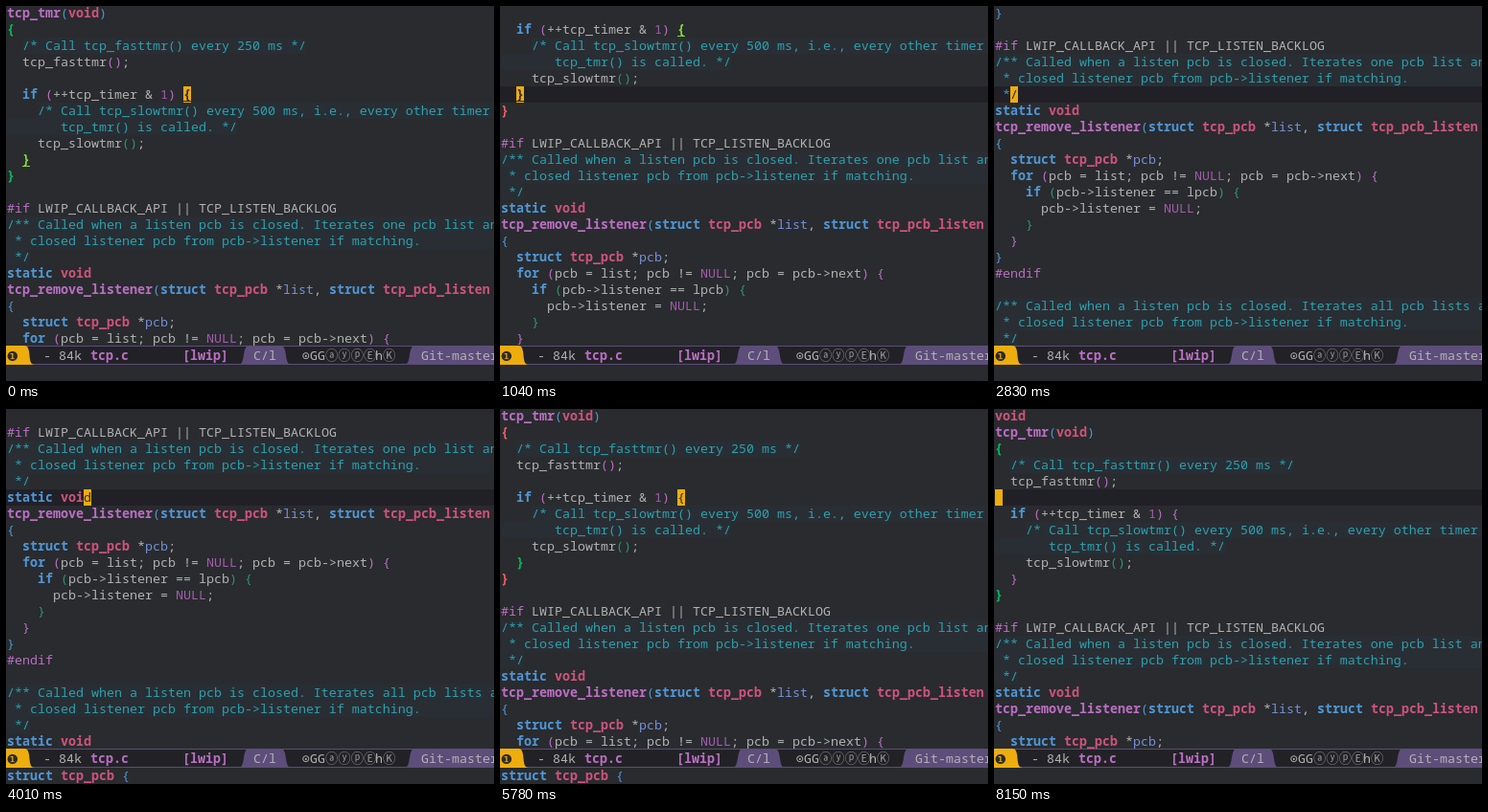
These frames come from a looping animation (509 by 392 pixels, 8.6 s). An HTML page:

```html
<!DOCTYPE html>
<html lang="en">
<head>
<meta charset="utf-8">
<title>Editor with a centred cursor</title>
<style>
html, body { margin: 0; width: 100%; height: 100%; overflow: hidden; background: #292b2e; }
#stage {
  position: relative; width: 509px; height: 392px; overflow: hidden;
  background: #292b2e; color: #b2b2b2; white-space: pre;
  font: 13.333px/17px "Noto Sans Mono", "DejaVu Sans Mono", monospace;
  font-variant-ligatures: none;
}
#view { position: absolute; inset: 0 0 37px; overflow: hidden; }
#code { position: absolute; left: 0; top: 0; width: 100%; }
.line { height: 17px; padding-left: 1px; overflow: hidden; }
.current { background: #212026; }
#cursor {
  position: absolute; top: 84px; width: 8px; height: 17px;
  background: #eead0e; color: #292b2e;
}
#cursor.matched { font-weight: bold; text-decoration: underline; text-underline-offset: 2px; }
#echo { position: absolute; left: 1px; top: 375px; }
svg { position: absolute; left: 0; top: 0; }
.comment { color: #2aa1ae; background: #292e34; }
.current .comment { background: none; }
.open { display: inline-block; width: 700px; height: 17px; }
.keyword, .type, .function { font-weight: bold; }
.keyword { color: #4f97d7; }
.type { color: #ce537a; }
.function, .directive { color: #bc6ec5; }
.variable { color: #7590db; }
.constant { color: #a45bad; }
.depth0 { color: #4f97d7; }
.depth1 { color: #bc6ec5; }
.depth2 { color: #2d9574; }
.depth3 { color: #67b11d; }
.around0, .around1, .around2, .match { font-weight: bold; }
.around0 { color: #00bb5e; }
.around1 { color: #ec5f63; }
.around2 { color: #cd5555; }
.match { color: #86dc2f; text-decoration: underline; text-underline-offset: 2px; }
</style>
</head>
<body>
<div id="stage">
  <div id="view"><div id="code"></div><div id="cursor"></div></div>
  <div id="echo"></div>
  <svg width="509" height="392" fill="#b2b2b2">
    <rect y="355" width="509" height="20" fill="#5d4d7a"/>
    <rect y="356" width="509" height="18" fill="#222226"/>
    <path fill="#eead0e" d="M0 355H19C28 355 21 375 30 375H0Z"/>
    <path fill="#5d4d7a" d="M254 355H286C295 355 289 375 298 375H242C251 375 245 355 254 355Z"/>
    <path fill="#5d4d7a" d="M427 355H509V375H415C424 375 418 355 427 355Z"/>
    <text x="0.5" y="371" fill="#292b2e" font-family="DejaVu Sans, sans-serif" font-size="14">❶</text>
    <text x="39" y="370">- 84k</text>
    <g fill="#bc6ec5" font-weight="bold">
      <text x="88" y="370">tcp.c</text>
      <text x="184" y="370">[lwip]</text>
    </g>
    <text x="258" y="370">C/l</text>
    <text x="309" y="370" font-family="DejaVu Sans Mono, monospace">⊙</text>
    <text x="317" y="370">GG</text>
    <g fill="#96969a" font-family="Noto Sans CJK SC, Noto Sans CJK JP, sans-serif" font-weight="300">
      <text x="333" y="370">ⓐⓨⓟⒺ</text>
      <text x="393" y="370">Ⓚ</text>
    </g>
    <text x="385" y="370">h</text>
    <text x="433" y="370">Git-master</text>
  </svg>
</div>
<script>
const source = `void
tcp_tmr(void)
{
  /* Call tcp_fasttmr() every 250 ms */
  tcp_fasttmr();

  if (++tcp_timer & 1) {
    /* Call tcp_slowtmr() every 500 ms, i.e., every other timer
       tcp_tmr() is called. */
    tcp_slowtmr();
  }
}

#if LWIP_CALLBACK_API || TCP_LISTEN_BACKLOG
/** Called when a listen pcb is closed. Iterates one pcb list and
 * closed listener pcb from pcb->listener if matching.
 */
static void
tcp_remove_listener(struct tcp_pcb *list, struct tcp_pcb_listen *lpcb)
{
  struct tcp_pcb *pcb;
  for (pcb = list; pcb != NULL; pcb = pcb->next) {
    if (pcb->listener == lpcb) {
      pcb->listener = NULL;
    }
  }
}
#endif

/** Called when a listen pcb is closed. Iterates all pcb lists and
 * closed listener pcb from pcb->listener if matching.
 */
static void
tcp_listen_closed(struct tcp_pcb *pcb)
{
#if LWIP_CALLBACK_API || TCP_LISTEN_BACKLOG`.split("\n");

const LOOP = 8600, ROW = 17, COLUMN = 8, CURSOR_ROW = 5, GOAL_COLUMN = 23;

// [time, cursor line, line the bracket highlighting has caught up with]
const steps = [
  [0, 6, 6], [150, 7, 6], [300, 7, 7], [590, 8, 7], [740, 9, 8], [890, 10, 9], [1040, 10, 10],
  [1340, 11, 10], [1490, 11, 11], [1640, 12, 11], [1790, 13, 12], [1940, 14, 13],
  [2380, 15, 15], [2830, 16, 16], [2970, 17, 17],
  [3270, 18, 17], [3420, 18, 18], [3570, 19, 18], [3710, 19, 19], [3860, 18, 18], [4010, 17, 17],
  [4300, 14, 17], [4450, 10, 14], [4750, 10, 10], [5050, 9, 9], [5190, 8, 8], [5490, 7, 7],
  [5780, 6, 7], [5930, 6, 6], [6070, 5, 6], [6220, 5, 5]
];
const ECHO_START = 3710, ECHO_END = 6510;

const byId = id => document.getElementById(id);
const code = byId("code"), cursor = byId("cursor"), echo = byId("echo");
const pairs = [];

function addSpan(parent, text, className) {
  const span = document.createElement("span");
  span.textContent = text;
  span.className = className;
  return parent.appendChild(span);
}

function tokenClass(token, previous, next, column) {
  if (/^(static|struct|if|for)$/.test(token)) return "keyword";
  if (/^(void|tcp_pcb|tcp_pcb_listen)$/.test(token)) return "type";
  if (token[0] === "#") return "directive";
  if (/^(\d+|NULL)$/.test(token)) return "constant";
  if (previous === "*") return "variable";
  return column === 0 && next === "(" ? "function" : "";
}

function addCode(parent, text, line, stack) {
  let column = 0;
  const tokens = text.match(/#?\w+|\s+|./g) || [];
  tokens.forEach((token, i) => {
    if (/[({]/.test(token)) {
      const open = addSpan(parent, token, "depth" + stack.length);
      stack.push({ open, start: line * 1000 + column, depth: stack.length });
    } else if (/[)}]/.test(token)) {
      const pair = stack.pop();
      pair.close = addSpan(parent, token, "depth" + pair.depth);
      pair.end = line * 1000 + column;
      pairs.push(pair);
    } else {
      addSpan(parent, token, tokenClass(token, tokens[i - 1], tokens[i + 1], column));
    }
    column += token.length;
  });
}

function buildCode() {
  const stack = [];
  let inComment = false;
  source.forEach((text, number) => {
    const line = document.createElement("div");
    line.className = "line";
    code.append(line);
    const start = inComment ? 0 : text.indexOf("/*");
    if (start < 0) return addCode(line, text, number, stack);
    inComment = !text.endsWith("*/");
    line.append(text.slice(0, start));
    addSpan(line, text.slice(start), inComment ? "comment open" : "comment");
  });
}

const columnAt = line => Math.max(0, Math.min(GOAL_COLUMN, source[line].length - 1));

// Colours the enclosing brackets and tells whether the cursor itself is on a matched one.
function highlightBrackets(line) {
  const point = line * 1000 + columnAt(line);
  const around = pairs.filter(p => p.start < point && p.end >= point)
    .sort((a, b) => b.start - a.start);
  for (const pair of pairs) {
    const level = around.indexOf(pair);
    const name = level < 0 ? "depth" + pair.depth : "around" + level;
    pair.open.className = pair.end === point ? "match" : name;
    pair.close.className = pair.start === point ? "match" : name;
  }
  return pairs.some(p => p.start === point || p.end === point);
}

function showStep([, line, highlighted]) {
  const column = columnAt(line);
  const character = source[line][column] || "";
  code.style.top = (CURSOR_ROW - line) * ROW - 1 + "px";
  // The line highlight is off while the cursor rests on an opening brace.
  [...code.children].forEach((row, i) =>
    row.classList.toggle("current", i === line && character !== "{"));
  cursor.style.left = 1 + column * COLUMN + "px";
  cursor.textContent = character;
  const onMatch = highlightBrackets(highlighted);
  cursor.classList.toggle("matched", onMatch && line === highlighted);
}

let shown;
function draw(now) {
  const time = now % LOOP;
  const step = steps.findLast(s => s[0] <= time);
  if (step !== shown) showStep(shown = step);
  echo.style.visibility = time >= ECHO_START && time < ECHO_END ? "visible" : "hidden";
}

buildCode();
addCode(echo, "struct tcp_pcb {", 0, []);
draw(0);

let startTime;
requestAnimationFrame(function tick(now) {
  startTime ??= now;
  draw(now - startTime);
  requestAnimationFrame(tick);
});
</script>
</body>
</html>
```
